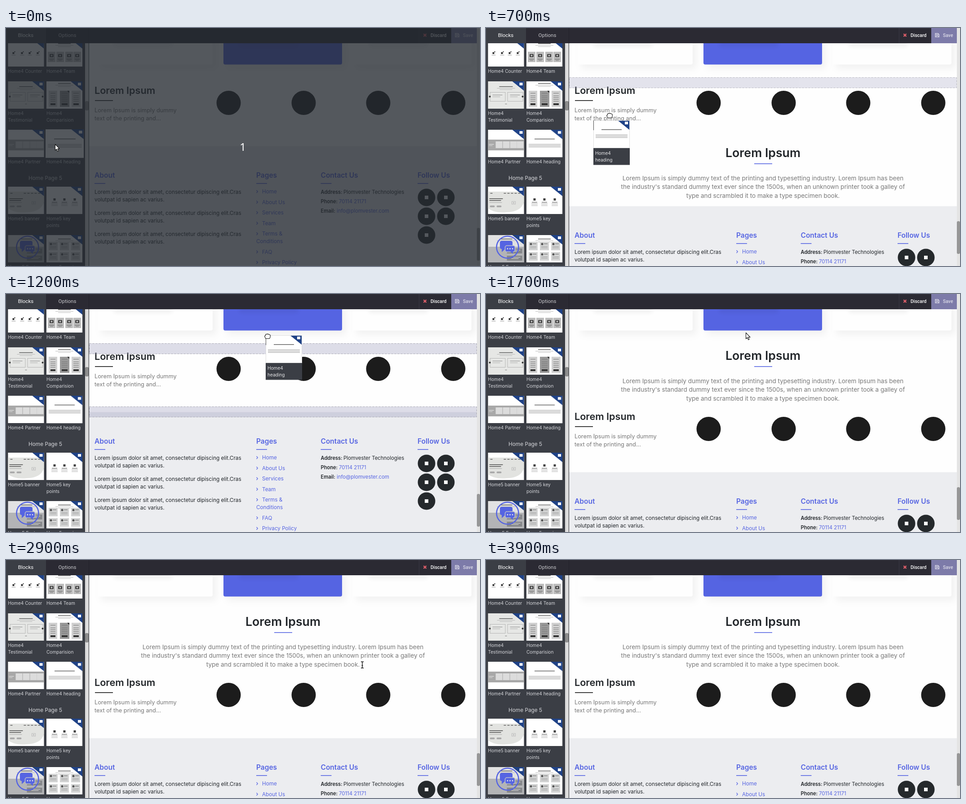
Write an HTML page that moves like this. It is 1055 px wide and 531 px high and loops after 4000 ms.

```html
<!DOCTYPE html>
<html lang="en">
<head>
<meta charset="utf-8">
<title>Page builder</title>
<style>
html, body { margin: 0; width: 100%; height: 100%; overflow: hidden; background: #fefefe; }
svg { display: block; width: 1055px; height: 531px; font-family: Inter, "Open Sans", sans-serif; }
.ui { font-family: Roboto, "Noto Sans", sans-serif; }
.count { font-family: "Noto Sans", "Open Sans", sans-serif; }
.b { font-weight: 600; }
.m { font-weight: 500; }
.mid { text-anchor: middle; }

.anim { animation: 4s step-end infinite; }
#veil { animation-name: veil; }
#cur { animation-name: path; }
#arrow { animation-name: arrow; }
#open { animation-name: open; }
#fist { animation-name: fist; }
#beam { animation-name: beam; }
#ghost { animation-name: ghost; }
#block { animation-name: block; }
#partner { animation-name: partner; }
#footer { animation-name: footer; }
#thumbBar { animation-name: thumbBar; }
#hover { animation-name: hover; }
#zoneTop { animation-name: zoneTop; }
#zoneEnd { animation-name: zoneEnd; }

@keyframes veil { 0% { opacity: 1 } 10%, 100% { opacity: 0 } }
@keyframes path {
  0% { transform: translate(109px, 259px) }
  10% { transform: translate(113px, 265px) }
  12.5% { transform: translate(120px, 262px) }
  15% { transform: translate(190px, 230px) }
  17.5% { transform: translate(275px, 195px) }
  20% { transform: translate(360px, 165px) }
  22.5% { transform: translate(450px, 135px) }
  25% { transform: translate(530px, 108px) }
  27.5% { transform: translate(572px, 90px) }
  30% { transform: translate(582px, 94px) }
  40% { transform: translate(578px, 86px) }
  45% { transform: translate(540px, 92px) }
  47.5% { transform: translate(455px, 112px) }
  50% { transform: translate(375px, 136px) }
  52.5% { transform: translate(332px, 144px) }
  57.5% { transform: translate(380px, 180px) }
  60% { transform: translate(470px, 205px) }
  62.5% { transform: translate(590px, 220px) }
  65% { transform: translate(720px, 232px) }
  67.5% { transform: translate(798px, 241px) }
  72.5% { transform: translate(793px, 234px) }
  75% { transform: translate(760px, 210px) }
  77.5% { transform: translate(690px, 165px) }
  80% { transform: translate(600px, 120px) }
  82.5% { transform: translate(520px, 88px) }
  85% { transform: translate(452px, 66px) }
  87.5%, 100% { transform: translate(160px, 19px) }
}
@keyframes arrow { 0%, 40%, 77.5% { opacity: 1 } 10%, 57.5%, 90%, 100% { opacity: 0 } }
@keyframes open { 0%, 12.5%, 100% { opacity: 0 } 10% { opacity: 1 } }
@keyframes fist { 0%, 40%, 100% { opacity: 0 } 12.5% { opacity: 1 } }
@keyframes beam { 0%, 77.5%, 100% { opacity: 0 } 57.5% { opacity: 1 } }
@keyframes ghost {
  0% { opacity: 0; transform: translate(100px, 250px) }
  12.5% { opacity: 1; transform: translate(100px, 250px) }
  15% { opacity: 1; transform: translate(160px, 228px) }
  17.5% { opacity: 1; transform: translate(239px, 206px) }
  20% { opacity: 1; transform: translate(335px, 172px) }
  22.5% { opacity: 1; transform: translate(430px, 138px) }
  25% { opacity: 1; transform: translate(518px, 110px) }
  27.5% { opacity: 1; transform: translate(567px, 89px) }
  30% { opacity: 1; transform: translate(578px, 92px) }
  40%, 100% { opacity: 0; transform: translate(578px, 92px) }
}
@keyframes block {
  0%, 22.5% { opacity: 0; transform: translateY(141px) }
  15% { opacity: 1; transform: translateY(141px) }
  40%, 100% { opacity: 1; transform: none }
}
@keyframes partner { 0% { transform: none } 40%, 100% { transform: translateY(134px) } }
@keyframes footer { 0%, 22.5% { transform: none } 15%, 40%, 100% { transform: translateY(134px) } }
@keyframes thumbBar { 0%, 22.5% { transform: none } 15%, 40%, 100% { transform: translateY(-15px) } }
@keyframes hover { 0% { transform: translate(-2px, -1px) scale(1.06, 1.04) } 15%, 100% { transform: none } }
@keyframes zoneTop {
  0%, 40%, 100% { opacity: 0 }
  12.5% { opacity: .6 } 17.5% { opacity: .8 } 22.5% { opacity: .9 } 27.5% { opacity: 1 } 35% { opacity: .9 }
}
@keyframes zoneEnd {
  0%, 15%, 40%, 100% { opacity: 0 }
  12.5% { opacity: .6 } 22.5% { opacity: .9 } 27.5% { opacity: 1 } 35% { opacity: .9 }
}
</style>
</head>
<body>
<svg id="stage" viewBox="0 0 1055 531"></svg>
<script>
const BLUE = '#5564e2', INK = '#212529', GREY = '#777', PANEL = '#3b3e45', LABEL = '#d5d6da';

const text = (x, y, size, str, fill = INK, cls = '') =>
  `<text x="${x}" y="${y}" font-size="${size}" fill="${fill}" class="${cls}">${str}</text>`;
const rect = (x, y, w, h, fill, more = '') =>
  `<rect x="${x}" y="${y}" width="${w}" height="${h}" fill="${fill}" ${more}/>`;
const dot = (x, y, r, fill, more = '') => `<circle cx="${x}" cy="${y}" r="${r}" fill="${fill}" ${more}/>`;
const path = (d, fill, more = '') => `<path d="${d}" fill="${fill}" ${more}/>`;
const anim = (id, body) => `<g id="${id}" class="anim">${body}</g>`;
const at = (x, y, body) => `<g transform="translate(${x} ${y})">${body}</g>`;
const each = (list, fn) => list.map(fn).join('');

// Sidebar thumbnails, 80 x 61, drawn from their own corner
const corner = path('M54 0H80V21Z', '#1f4287') + rect(70, 3, 7, 6, '#fff');
const thumb = (body, bg = '#fff') => rect(0, 0, 80, 61, bg) + body + corner;
const title = (y, w = 28) => rect(40 - w / 2, y, w, 1.4, '#555') + rect(20, y + 4, 40, .8, '#aaa') + rect(26, y + 7, 28, .8, '#aaa');

const art = {
  counter: thumb(each([12, 31, 48, 66], x =>
    rect(x - 2, 29, 4, 4, '#333') + rect(x + 2, 27, 2, 2, '#333') + rect(x - 4, 35, 9, 1, '#999'))),
  team: thumb(title(9) + each([3, 22, 42, 60], x =>
    rect(x, 28, 17, 23, '#bdbdbd') + rect(x + 4, 33, 9, 7, '#444', 'rx="1.5"') + dot(x + 8.5, 36.5, 2, '#bbb') +
    rect(x + 3, 44, 11, 1, '#555') + rect(x + 5, 47, 7, 1, '#777'))),
  testimonial: thumb(title(11, 30) + each([4, 43], x =>
    rect(x + .5, 24.5, 34, 20, 'none', 'stroke="#aaa" stroke-width=".8"') +
    rect(x + 6, 30, 22, 1, '#888') + rect(x + 6, 34, 17, 1, '#aaa')) +
    dot(4, 34, 2, '#333') + dot(77, 34, 2, '#333') + rect(38, 50, 4, 1, '#777'), '#e6e7e5'),
  comparison: thumb(title(4) + each([[5, 19, '#d0d0d0'], [30, 21, '#999'], [56, 20, '#d0d0d0']], ([x, w, c]) =>
    rect(x, 21, w, 36, c) + each([26, 32, 36, 40, 44], y => rect(x + 4, y, w - 8, 1, '#777')) +
    rect(x + 4, 49, w - 8, 4, '#333')) + path('M46 21h5v5z', '#333')),
  partner: thumb(rect(0, 22, 80, 24, '#a8a8a8') + rect(2, 32, 11, 1, '#eee') + rect(2, 35, 8, 1, '#ddd') +
    each([17, 33, 49, 64], x => rect(x, 26, 15, 15, '#dcdcdc'))),
  heading: thumb(rect(18, 20, 45, 1.4, '#555') + each([32, 35, 38], y => rect(5, y, 71, .9, '#888'))),
  banner: thumb(path('M0 11H80V34Q74 56 42 57Q14 60 0 48Z', '#e2e3e0') +
    each([5, 35, 43, 51, 59, 67], x => rect(x, 14, 5, 1.4, '#555')) + rect(3, 26, 30, 1.6, '#555') +
    rect(3, 30, 26, 1.6, '#555') + rect(3, 35, 28, .8, '#999') + rect(4, 42, 11, 4, '#aaa', 'rx="2"') +
    rect(19, 42, 11, 4, '#aaa', 'rx="2"') + rect(53, 33, 8, 6, 'none', 'stroke="#bbb"') + dot(57, 36, 1.5, '#bbb')),
  points: thumb(each([18, 40, 63], x =>
    rect(x - 2.5, 26, 5, 5, '#444') + rect(x - 6, 34, 12, 1.4, '#777') +
    each([37, 39.5, 42], y => rect(x - 7, y, 14, .8, '#aaa')))),
  feature: thumb(rect(0, 26, 80, 35, '#b3b4b6') + title(8) + each([30, 46], y =>
    rect(42, y, 34, 11, '#85878a') + rect(52, y + 3, 20, 1, '#ddd') + rect(52, y + 6, 16, 1, '#ddd')), '#e2e2e2'),
  grid: thumb(title(8) + each([0, 1, 2, 3, 4, 5], i => {
    const x = 5 + i % 3 * 25, y = 15 + (i > 2) * 23;
    return rect(x, y, 20, 19, '#d2d3d3') + dot(x + 5, y + 5, 2.5, '#555') +
      rect(x + 9, y + 4, 8, 1, '#666') + each([10, 13], d => rect(x + 3, y + d, 14, .9, '#999'));
  }))
};

const rows = [
  [25, [['counter', 'Home4 Counter'], ['team', 'Home4 Team']]],
  [119, [['testimonial', 'Home4', 'Testimonial'], ['comparison', 'Home4', 'Comparision']]],
  [227, [['partner', 'Home4 Partner'], ['heading', 'Home4 heading']]],
  [354, [['banner', 'Home5 banner'], ['points', 'Home5 key', 'points']]],
  [462, [['feature', 'Home 5 Feature'], ['grid', 'Home5 services']]]
];
const sidebar = rect(0, 34, 176, 497, PANEL) +
  each(rows, ([y, cells]) => each(cells, ([name, ...lines], i) => at(i ? 90 : 4.5, y,
    (name === 'heading' ? anim('hover', art[name]) : art[name]) +
    each(lines, (s, n) => text(0, 75 + n * 14.5, 10.1, s, LABEL))))) +
  text(87.5, 338.5, 11.8, 'Home Page 5', LABEL, 'mid') +
  dot(48, 489, 24.5, 'none', `stroke="${BLUE}" stroke-width="2.6"`) +
  rect(31, 475, 28, 18, BLUE, 'rx="4"') + path('M35 491v9l9-8z', BLUE) +
  rect(42.5, 485.5, 22, 14, BLUE, 'rx="4" stroke="#c4c5c8" stroke-width="1.5"') + path('M54 499l6 5v-6z', BLUE) +
  each([48, 53.5, 59], x => dot(x, 492.5, 1.4, '#e4e4e8')) +
  rect(176, 34, 8, 497, '#dcdcdc') + rect(176, 163, 8, 21, '#8c8c8c', 'rx="3"') + rect(184, 34, 1, 497, '#22242a');

const topbar = rect(0, 0, 1048, 34, '#2b2a33') + rect(0, 0, 89, 34, PANEL) + rect(184, 0, 1, 34, '#222129') +
  rect(919, 0, 1, 34, '#3b3a45') + rect(991, 0, 57, 34, '#7d7ba9') +
  `<g class="ui">` + text(44, 20, 11.6, 'Blocks', '#fff', 'mid') + text(136.5, 20, 11.5, 'Options', '#c9c9cd', 'mid') +
  text(945, 20, 10.4, 'Discard', '#fff', 'm') + text(1017, 20, 10.4, 'Save', '#dcdbe8', 'm') + '</g>' +
  path('M929.5 13l6 6m0-6l-6 6', 'none', 'stroke="#e0606a" stroke-width="2.4"') +
  path('M1000 12h6l2.5 2.5v5.5h-8.5zM1002 12v3h4v-3M1002 20v-3h4.5v3', 'none', 'stroke="#e4e3ee" stroke-width="1.1"');

const cards = each([[204, '#fefefe'], [484, BLUE], [772, '#fefefe']], ([x, fill]) =>
  rect(x, 20, x === 204 ? 256 : 264, 61.5, fill, 'rx="4" style="filter:drop-shadow(8px 9px 8px #0000000d)"') +
  rect(x + 36, 24, 130, 18, '#000', 'opacity=".05" style="filter:blur(5px)"'));

const partner = text(197, 147, 21.6, 'Lorem Ipsum', INK, 'b') + rect(198, 161, 40, 1.6, '#111') +
  text(197, 188, 12.75, 'Lorem Ipsum is simply dummy', GREY) + text(197, 206, 12.75, 'text of the printing and...', GREY) +
  each([495.5, 662.5, 828.5, 995.5], x => dot(x, 167, 27, '#1c1c1c'));

const block = text(616.5, 147, 26.7, 'Lorem Ipsum', INK, 'b mid') + rect(597, 161, 40, 1.6, BLUE) +
  each(['Lorem Ipsum is simply dummy text of the printing and typesetting industry. Lorem Ipsum has been',
    'the industry\'s standard dummy text ever since the 1500s, when an unknown printer took a galley of',
    'type and scrambled it to make a type specimen book.'],
    (s, i) => text(616.5, 199 + i * 19.4, 13.5, s, GREY, 'mid'));

const links = [['Home', 365], ['About Us', 388.5], ['Services', 412], ['Team', 435.5], ['Terms &amp;', 459],
  ['FAQ', 499.5], ['Privacy Policy', 523]];
const contact = [['Address:', 751, 'Plomvester Technologies', INK], ['Phone:', 741, '70114 21171', BLUE],
  ['Email:', 736, 'info@plomvester.com', BLUE]];
const footer = rect(185, 263.5, 863, 268, '#ecedf0') +
  each([[197, 'About'], [557, 'Pages'], [700.5, 'Contact Us'], [916, 'Follow Us']], ([x, s]) =>
    text(x, 334, 15.5, s, BLUE, 'b') + rect(x, 346, 24, 1.6, BLUE)) +
  each([369.5, 416.5, 463.5], y =>
    text(197, y, 11.8, 'Lorem ipsum dolor sit amet, consectetur dipiscing elit.Cras') +
    text(197, y + 17, 11.8, 'volutpat id sapien ac varius.')) +
  each(links, ([s, y]) => text(570, y + 4.3, 11.7, s, BLUE) +
    path(`M557.5 ${y - 3}l2.8 3l-2.8 3`, 'none', `stroke="${BLUE}" stroke-width="1.2"`)) +
  text(557, 480.3, 11.7, 'Conditions', BLUE) +
  each(contact, ([k, x, v, c], i) => text(700.5, 369.5 + i * 21, 11.1, k, INK, 'b') + text(x, 369.5 + i * 21, 11.4, v, c)) +
  each([[936, 378], [979, 378], [936, 420], [979, 420], [936, 462]], ([x, y]) =>
    dot(x, y, 19.5, '#25292c') + rect(x - 4, y - 4, 8, 8, '#fff'));

const zone = (id, y) => anim(id, rect(185, y, 863, 24, '#5a5a90', 'fill-opacity=".2"') +
  rect(185.5, y + .5, 862, 23, 'none', 'stroke="#aaaab4" stroke-dasharray="4 3"'));

const ghost = art.heading + rect(.5, .5, 80, 61, 'none', 'stroke="#ddd"') + rect(0, 0, 1, 22, '#444') +
  rect(0, 62, 81, 37.5, PANEL) + text(4, 77, 10.1, 'Home4', '#e6e6e8') + text(4, 91.5, 10.1, 'heading', '#e6e6e8');

const line = 'stroke="#111" stroke-width="1.1" stroke-linejoin="round"';
const cursor =
  anim('arrow', path('M.5 .5V14L3.6 11.2L5.8 16.2L8 15.2L5.8 10.4H10Z', '#fff', line)) +
  anim('open', path('M-2.5 7.5L-6.5 2Q-7.5 0-5.5 .2L-3.5 2L-5-3Q-4.5-5-3-3.5L-2-1L-2.3-5.5Q-1-7.5 0-5.5L.4-1L1.6-5.5Q3-7 3.6-5L3.2-.5L5-3Q7-4 6.7-2L5 4L4 7.5Z', '#fff', line)) +
  anim('fist', path('M-4 5.5L-6 1.5Q-7-1-4.5-1V-3Q-3-5.5-1.5-4Q0-5.8 1.5-4Q3.2-5 4-3.3Q6.5-3.5 6.3-.5Q6.3 3 4.5 5.5Z', '#fff', line)) +
  anim('beam', path('M-3-7h2l1 1l1-1h2M0-6v12M-3 7h2l1-1l1 1h2M-1.5 1.5h3', 'none', 'stroke="#111" stroke-width="1.4"'));

document.getElementById('stage').innerHTML =
  rect(185, 34, 863, 497, '#fefefe') + cards + anim('partner', partner) + anim('footer', footer) +
  anim('block', block) + zone('zoneTop', 110) + zone('zoneEnd', 251) + sidebar + topbar +
  rect(1048, 0, 7, 531, '#e4e4e4') + anim('thumbBar', rect(1048, 446, 7, 73, '#979797', 'rx="3"')) +
  anim('ghost', ghost) +
  anim('veil', rect(0, 0, 1055, 531, '#252a30', 'opacity=".78"') + text(527, 274, 24, '1', '#fff', 'count mid')) +
  anim('cur', cursor);
</script>
</body>
</html>
```
